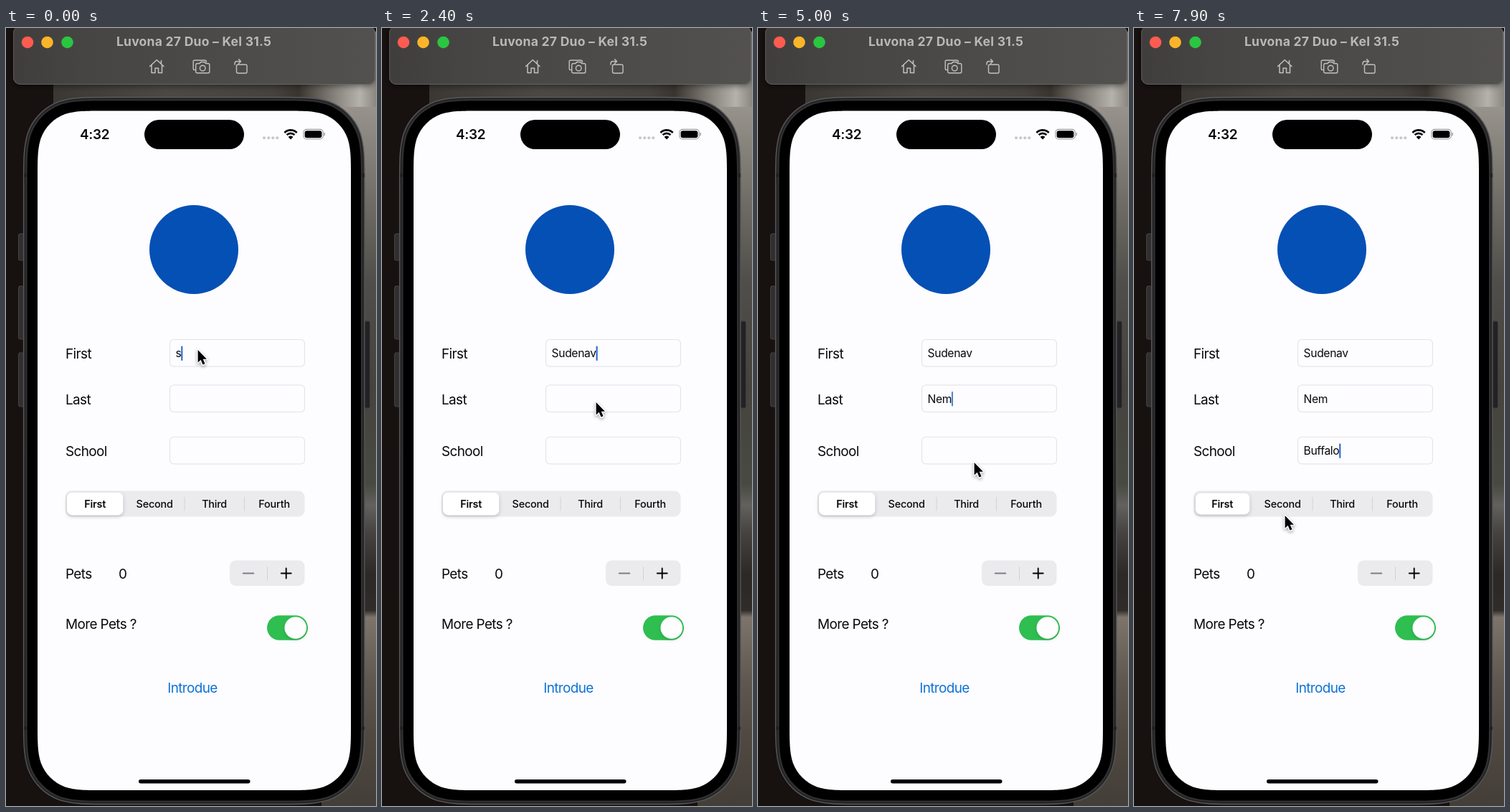
Animation of 516 by 1085 pixels, one loop 8 s. Source, as an HTML page with a canvas:

```html
<!DOCTYPE html>
<html lang="en">
<head>
<meta charset="utf-8">
<title>Sign-up form</title>
<style>
html, body { margin: 0; width: 100%; height: 100%; overflow: hidden; background: #17110f; }
canvas { display: block; width: 516px; height: 1085px; }
</style>
</head>
<body>
<canvas id="stage"></canvas>
<script>
const W = 516, H = 1085, LOOP = 8000, STEP = 100;
const canvas = document.getElementById('stage');
const ctx = canvas.getContext('2d');
const dpr = window.devicePixelRatio || 1;
canvas.width = W * dpr;
canvas.height = H * dpr;

const INK = '#08070a', SCREEN = '#fdfcff', GREY = '#ebeaed', ICON = '#c3c1c0';

// Each key press: [time, text after it]
const fields = [
  { y: 434.5, focus: -100, keys: [[0, 's'], [150, ''], [250, 'S'], [450, 'Su'], [600, 'Sud'],
    [780, 'Sude'], [960, 'Suden'], [1850, 'Sudena'], [2150, 'Sudenav']] },
  { y: 498, focus: 2800, keys: [[3300, 'N'], [3650, 'Ne'], [4030, 'Nem']] },
  { y: 570.5, focus: 5300, keys: [[5700, 'B'], [5900, 'Bu'], [6100, 'Buf'], [6350, 'Buff'],
    [6500, 'Buffa'], [6700, 'Buffal'], [6850, 'Buffalo']] }
];

// Pointer stops: [time, x, y]
const pointer = [[0, 267, 448], [700, 267, 448], [1300, 296, 525], [1900, 296, 525], [2300, 298, 521],
  [2500, 298, 521], [2800, 283, 522], [4200, 283, 522], [4800, 301, 605], [7000, 301, 605], [7600, 210, 679]];

const clamp = v => Math.max(0, Math.min(1, v));
const ease = v => v * v * (3 - 2 * v);

function rect(x, y, w, h, r, fill, stroke, lw = 1) {
  ctx.beginPath();
  ctx.roundRect(x, y, w, h, r);
  paint(fill, stroke, lw);
}

// Rectangle whose corners blend gradually into the sides
function smoothRect(x, y, w, h, r, fill, stroke, lw = 1) {
  const corner = (cx, cy, ux, uy, vx, vy) => {
    const p = (a, b) => [cx + r * (a * ux + b * vx), cy + r * (a * uy + b * vy)];
    ctx.lineTo(...p(1.529, 0));
    ctx.bezierCurveTo(...p(1.088, 0), ...p(0.868, 0), ...p(0.631, 0.075));
    ctx.bezierCurveTo(...p(0.373, 0.169), ...p(0.169, 0.373), ...p(0.075, 0.631));
    ctx.bezierCurveTo(...p(0, 0.868), ...p(0, 1.088), ...p(0, 1.529));
  };
  ctx.beginPath();
  corner(x, y, 0, 1, 1, 0);
  corner(x + w, y, -1, 0, 0, 1);
  corner(x + w, y + h, 0, -1, -1, 0);
  corner(x, y + h, 1, 0, 0, -1);
  ctx.closePath();
  paint(fill, stroke, lw);
}

function paint(fill, stroke, lw) {
  if (fill) { ctx.fillStyle = fill; ctx.fill(); }
  if (stroke) { ctx.strokeStyle = stroke; ctx.lineWidth = lw; ctx.stroke(); }
}

function circle(x, y, r, fill) {
  ctx.beginPath();
  ctx.arc(x, y, r, 0, Math.PI * 2);
  paint(fill);
}

function text(s, x, y, size, { weight = 400, color = INK, align = 'left', gap = 0 } = {}) {
  ctx.font = `${weight} ${size}px Inter, "Open Sans", sans-serif`;
  ctx.letterSpacing = gap + 'px';
  ctx.textAlign = align;
  ctx.fillStyle = color;
  ctx.fillText(s, x, y);
  return ctx.measureText(s).width;
}

function path(d, color, lw) {
  ctx.strokeStyle = color;
  ctx.lineWidth = lw;
  ctx.stroke(new Path2D(d));
}

function gradient(x0, y0, x1, y1, stops) {
  const g = ctx.createLinearGradient(x0, y0, x1, y1);
  stops.forEach(([at, color]) => g.addColorStop(at, color));
  return g;
}

function withShadow(color, blur, dy, draw) {
  ctx.save();
  ctx.shadowColor = color;
  ctx.shadowBlur = blur * dpr;
  ctx.shadowOffsetY = dy * dpr;
  draw();
  ctx.restore();
}

function backdrop() {
  rect(0, 0, W, H, 0, '#17110f');
  rect(66, 0, W - 66, 180, 0, gradient(66, 0, W, 0, [[0, '#3b3833'], [0.35, '#4c4944'],
    [0.68, '#46423d'], [0.76, '#3a342f'], [0.86, '#7f7b74'], [0.95, '#b5b2ac'], [1, '#8b8780']]));
  rect(440, 110, 76, H - 110, 0, gradient(0, 110, 0, H, [[0, '#97938c'], [0.13, '#716e68'],
    [0.25, '#504e4a'], [0.4, '#45433e'], [0.54, '#484a42'], [0.57, '#63615e'], [0.61, '#454240'],
    [0.67, '#2b2826'], [0.72, '#302c2a'], [0.73, '#7d756b'], [0.82, '#5f5850'], [0.9, '#4f4942'],
    [1, '#443e38']]));
  rect(66, 0, W - 66, 5, 0, '#100d0c');
}

function toolbar() {
  withShadow('rgba(0,0,0,.45)', 8, 2, () => rect(10, -1, 505, 80, [8, 8, 10, 10], '#4b4948'));
  rect(10, -1, 505, 80, [8, 8, 10, 10],
    gradient(10, 0, 515, 0, [[0, '#403e3d'], [0.2, '#474544'], [0.6, '#4d4b4a'], [1, '#53514f']]));
  rect(10.5, -2, 504, 80.5, [8, 8, 10, 10], null, 'rgba(150,148,146,.35)');
  circle(30, 20, 8.3, '#fe5b51');
  circle(57.5, 20, 8.3, '#fcb529');
  circle(85.5, 20, 8.3, '#2bc640');
  text('Luvona 27 Duo – Kel 31.5', 262, 25, 17.5, { weight: 700, color: '#bab8b7', align: 'center', gap: 0.25 });

  ctx.lineJoin = ctx.lineCap = 'round';
  path('M200.5 53.5L210.3 44.5L220 53.5M203 51.5V62.5H208V56H212.5V62.5H217.5V51.5M216.5 45.5V49.5', ICON, 1.5);
  path('M264 58.5H263A1.8 1.8 0 0 1 261.2 56.7V46.8A1.8 1.8 0 0 1 263 45H277.5A1.8 1.8 0 0 1 279.3 46.8V47.5', ICON, 1.4);
  path('M266.5 49.5H270L271.5 47.5H277L278.5 49.5H282A1.8 1.8 0 0 1 283.8 51.3V61A1.8 1.8 0 0 1 282 62.8H266.5A1.8 1.8 0 0 1 264.7 61V51.3A1.8 1.8 0 0 1 266.5 49.5Z', ICON, 1.4);
  path('M278 56A3.8 3.8 0 1 1 270.4 56A3.8 3.8 0 1 1 278 56', ICON, 1.4);
  path('M323.5 51H334A2 2 0 0 1 336 53V61A2 2 0 0 1 334 63H323.5A2 2 0 0 1 321.5 61V53A2 2 0 0 1 323.5 51M319 51V49.5A3 3 0 0 1 322 46.5H327M324.5 43.5L327.5 46.5L324.5 49.5', ICON, 1.4);
}

function phone() {
  [[287, 37], [360, 74], [453, 75]].forEach(([y, h]) => rect(17.5, y, 8, h, 2, '#302e2f', '#454345'));
  rect(498, 409, 9.5, 121, 2, '#222123', '#3d3b3d');
  smoothRect(24.5, 96.5, 475.5, 986, 79, '#303032', '#575658', 1.3);
  smoothRect(26.5, 98.5, 471.5, 982, 77, null, '#1b1b1d', 1);
  [203, 974].forEach(y => [25, 496].forEach(x => rect(x, y, 4, 5, 0, '#222224')));
  smoothRect(29.5, 101.5, 465.5, 976, 74, '#000');
  smoothRect(44, 115.5, 437, 947.5, 61, SCREEN);
}

function statusBar() {
  text('4:32', 103, 155, 18.9, { weight: 600, gap: -0.3 });
  rect(193, 128, 139, 41, 20.5, '#000');
  [360, 366.2, 372.3, 378.2].forEach(x => circle(x, 153.2, 2, '#c8c6ca'));

  ctx.lineCap = 'butt';
  [12.2, 7.7].forEach(r => {
    ctx.beginPath();
    ctx.arc(397, 154.6, r, -Math.PI * 0.75, -Math.PI * 0.25);
    paint(null, '#000', 2.6);
  });
  ctx.beginPath();
  ctx.moveTo(397, 155.4);
  ctx.arc(397, 155.4, 4.8, -Math.PI * 0.75, -Math.PI * 0.25);
  paint('#000');

  rect(414.8, 141.4, 27.4, 13.6, 4.4, null, '#9c9a9e', 1.1);
  rect(416.6, 143.2, 23.8, 10, 2.9, '#000');
  rect(443.3, 145.8, 1.6, 4.8, 1, '#a5a3a7');
}

function caretAlpha(age) {
  const p = (age % 1000) / 1000;
  return p < 0.65 ? 1 - clamp((p - 0.45) / 0.2) : clamp((p - 0.85) / 0.15);
}

function drawField(f, t, active) {
  rect(228.5, f.y, 188, 37.5, 5.5, SCREEN, '#e3e2e6', 1.1);
  const [since, value] = f.keys.filter(k => k[0] <= t).pop() || [f.focus, ''];
  const end = 236.5 + text(value, 236.5, f.y + 24.7, 15.6, { gap: -0.3 });
  if (active) {
    ctx.globalAlpha = caretAlpha(t - since);
    rect(end - 0.2, f.y + 9, 2.1, 20.5, 1, '#2868cf');
    ctx.globalAlpha = 1;
  }
}

function segments(t) {
  rect(83, 645.5, 333.5, 36, 8.5, GREY);
  [249, 332.5].forEach(x => rect(x - 0.5, 654, 1, 19.5, 0, '#d3d2d5'));
  const press = ease(clamp((t - 7700) / 200));
  const left = 85 + press, width = 78.3 - 3 * press;
  withShadow('rgba(0,0,0,.2)', 5, 2, () =>
    rect(left, 647.8 + press, width, 31.6 - 2 * press, 7, '#fff'));
  ['First', 'Second', 'Third', 'Fourth'].forEach((s, i) => {
    const x = i ? 123.6 + i * 83.5 : 124.2 - press;
    text(s, x, 669, 14.4, { weight: i ? 500 : 600, align: 'center', gap: -0.2 });
  });
}

function form(t) {
  circle(262, 309, 62, '#0550b5');
  const label = (s, x, y) => text(s, x, y, 18.9, { gap: -0.6 });
  label('First', 83, 461);
  label('Last', 83, 524.5);
  label('School', 83, 596.5);
  label('Pets', 83, 768);
  label('0', 157, 768);
  label('More Pets ?', 83, 838);

  const active = fields.filter(f => f.focus <= t).pop();
  fields.forEach(f => drawField(f, t, f === active));
  segments(t);

  rect(312, 742.5, 104.5, 35.5, 8.5, GREY);
  rect(364, 751, 1, 19.5, 0, '#d3d2d5');
  ctx.lineCap = 'round';
  path('M330.7 760.5H345.3', '#7e7d81', 1.8);
  path('M383.8 760.5H397.7M390.7 753.5V767.5', '#000', 1.9);

  rect(364, 819.3, 57, 34.4, 17.2, '#2fbe50');
  withShadow('rgba(0,0,0,.12)', 4, 2, () => circle(403.8, 836.5, 15.3, '#fefdff'));

  text('Introdue', 260, 927, 18.9, { color: '#0c73d6', align: 'center', gap: -0.6 });
  rect(185, 1048, 155.5, 5.5, 2.75, '#000');
}

function drawPointer(t) {
  const i = pointer.findLastIndex(stop => stop[0] <= t);
  const [t0, x0, y0] = pointer[i];
  const [t1, x1, y1] = pointer[i + 1] || [LOOP, x0, y0];
  const k = ease((t - t0) / (t1 - t0));
  ctx.save();
  ctx.translate(x0 + (x1 - x0) * k + 0.6, y0 + (y1 - y0) * k + 1);
  ctx.scale(0.92, 0.92);
  const arrow = new Path2D('M0 0V19L4.4 15L7.5 22.4L10.8 21L7.7 13.8H13.4Z');
  ctx.lineJoin = 'round';
  ctx.strokeStyle = '#fff';
  ctx.lineWidth = 3;
  withShadow('rgba(0,0,0,.35)', 4, 2, () => ctx.stroke(arrow));
  ctx.fillStyle = '#000';
  ctx.fill(arrow);
  ctx.restore();
}

function frame(now) {
  const t = Math.floor((now % LOOP) / STEP) * STEP;
  ctx.setTransform(dpr, 0, 0, dpr, 0, 0);
  backdrop();
  toolbar();
  phone();
  statusBar();
  form(t);
  drawPointer(t);
  requestAnimationFrame(frame);
}

frame(0);
</script>
</body>
</html>
```
